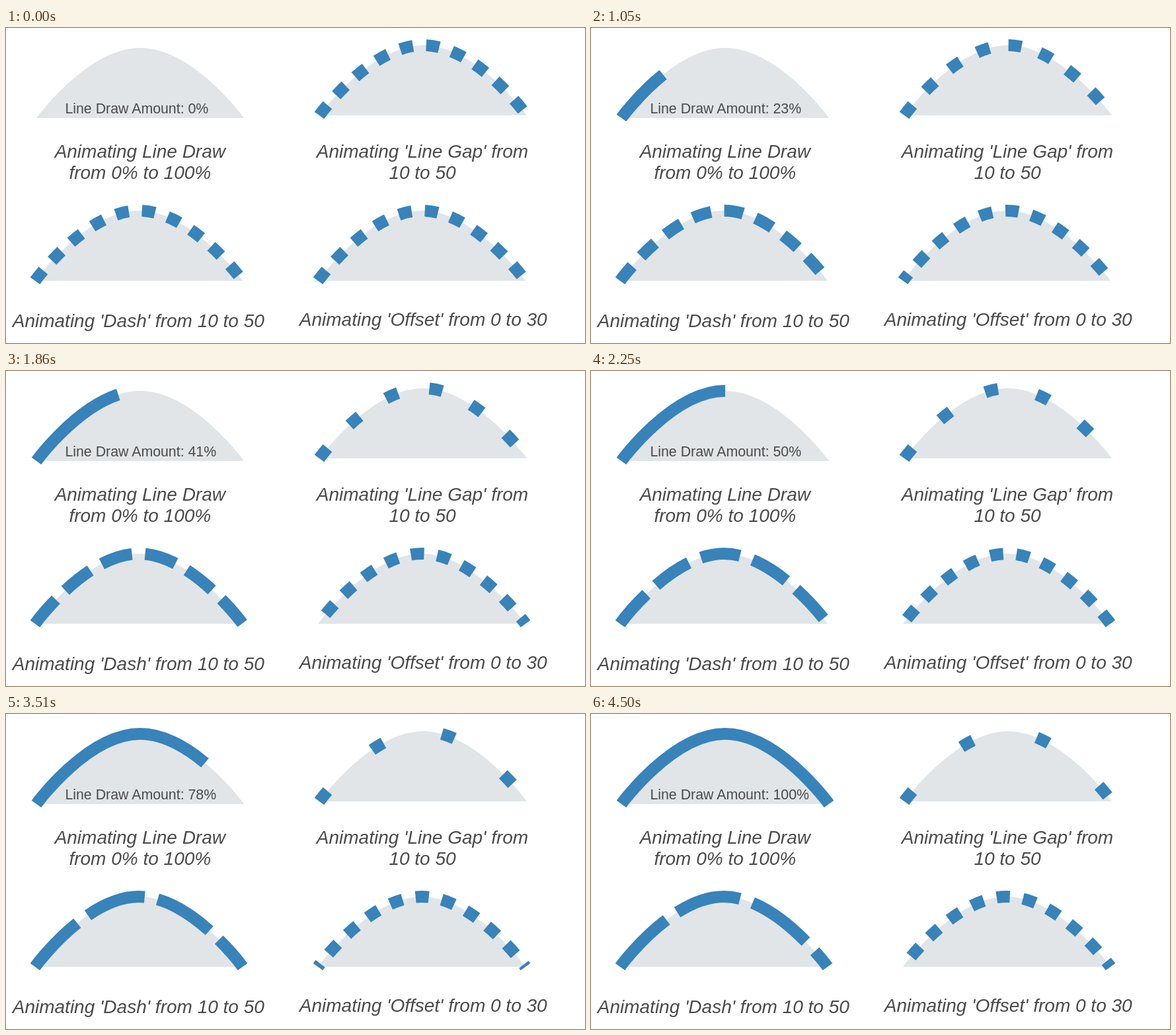
Write an HTML page that moves like this. It is 876x476 px and loops after 9.5 s.

```html
<!DOCTYPE html>
<html lang="en">
<head>
<meta charset="utf-8">
<title>Line animations</title>
<style>
  html, body { margin: 0; width: 100%; height: 100%; overflow: hidden; background: #fff; }
  svg { display: block; width: 876px; height: 476px; }
  text { font-family: "Liberation Sans", Arial, Helvetica, sans-serif; fill: #4a4a4a; }
  .title { font-size: 28px; font-style: italic; text-anchor: middle; }
  .amount { font-size: 21.33px; white-space: pre; }
  .hill { fill: #e1e5e8; }
  .line { fill: none; stroke: #3783ba; stroke-width: 18; }
</style>
</head>
<body>
<svg id="stage" viewBox="0 0 876 476" xmlns="http://www.w3.org/2000/svg"></svg>
<script>
  const STEP = 30, RUN = 4500, LOOP = 9500;
  const stage = document.getElementById('stage');

  function add(tag, attrs, text = '') {
    const el = document.createElementNS('http://www.w3.org/2000/svg', tag);
    for (const key in attrs) el.setAttribute(key, attrs[key]);
    el.textContent = text;
    return stage.appendChild(el);
  }

  // Grey hill with a blue stroke along its upper edge; x, y is the left foot.
  function addHill(x, y) {
    const d = `M${x} ${y}c0 0 77 -106 157 -106c80 0 157 106 157 106`;
    add('path', { class: 'hill', d: d + 'z' });
    return add('path', { class: 'line', d });
  }

  function addTitle(x, y, ...rows) {
    rows.forEach((row, i) => add('text', { class: 'title', x, y: y + 32 * i }, row));
  }

  const draw = addHill(46, 136);
  const gap = addHill(474, 132);
  const dash = addHill(44, 382);
  const offset = addHill(472, 382);
  const amount = add('text', { class: 'amount', x: 89.4, y: 128.5 });

  addTitle(202.8, 196, 'Animating Line Draw', 'from 0% to 100%');
  addTitle(630, 196, "Animating 'Line Gap' from", '10 to 50');
  addTitle(200.3, 452, "Animating 'Dash' from 10 to 50");
  addTitle(631.2, 450, "Animating 'Offset' from 0 to 30");

  const total = draw.getTotalLength();

  // cubic-bezier(.42, 0, .58, 1), solved by bisection
  function easeInOut(p) {
    if (p <= 0 || p >= 1) return p;
    let lo = 0, hi = 1, s = 0.5;
    for (let i = 0; i < 30; i++) {
      s = (lo + hi) / 2;
      const x = 1.26 * s * (1 - s) ** 2 + 1.74 * s * s * (1 - s) + s ** 3;
      if (x < p) lo = s; else hi = s;
    }
    return s * s * (3 - 2 * s);
  }

  function setDash(line, on, off, shift = 0) {
    line.style.strokeDasharray = `${on}px ${off}px`;
    line.style.strokeDashoffset = `${shift}px`;
  }

  function render(ms) {
    const t = Math.floor((ms % LOOP) / STEP) * STEP;
    const p = Math.min(t / RUN, 1);
    const e = easeInOut(p);

    draw.style.visibility = p > 0 ? 'visible' : 'hidden';
    setDash(draw, p < 1 ? total * p : total + 1, total + 1);
    amount.textContent = `Line Draw Amount: ${Math.round(p * 100)}%`;

    setDash(gap, 20, 20 + 80 * e);
    setDash(dash, 20 + 80 * e, 20);
    setDash(offset, 20, 20, 60 * e);
  }

  const start = performance.now();
  function tick() {
    render(performance.now() - start);
    requestAnimationFrame(tick);
  }
  tick();
</script>
</body>
</html>
```
